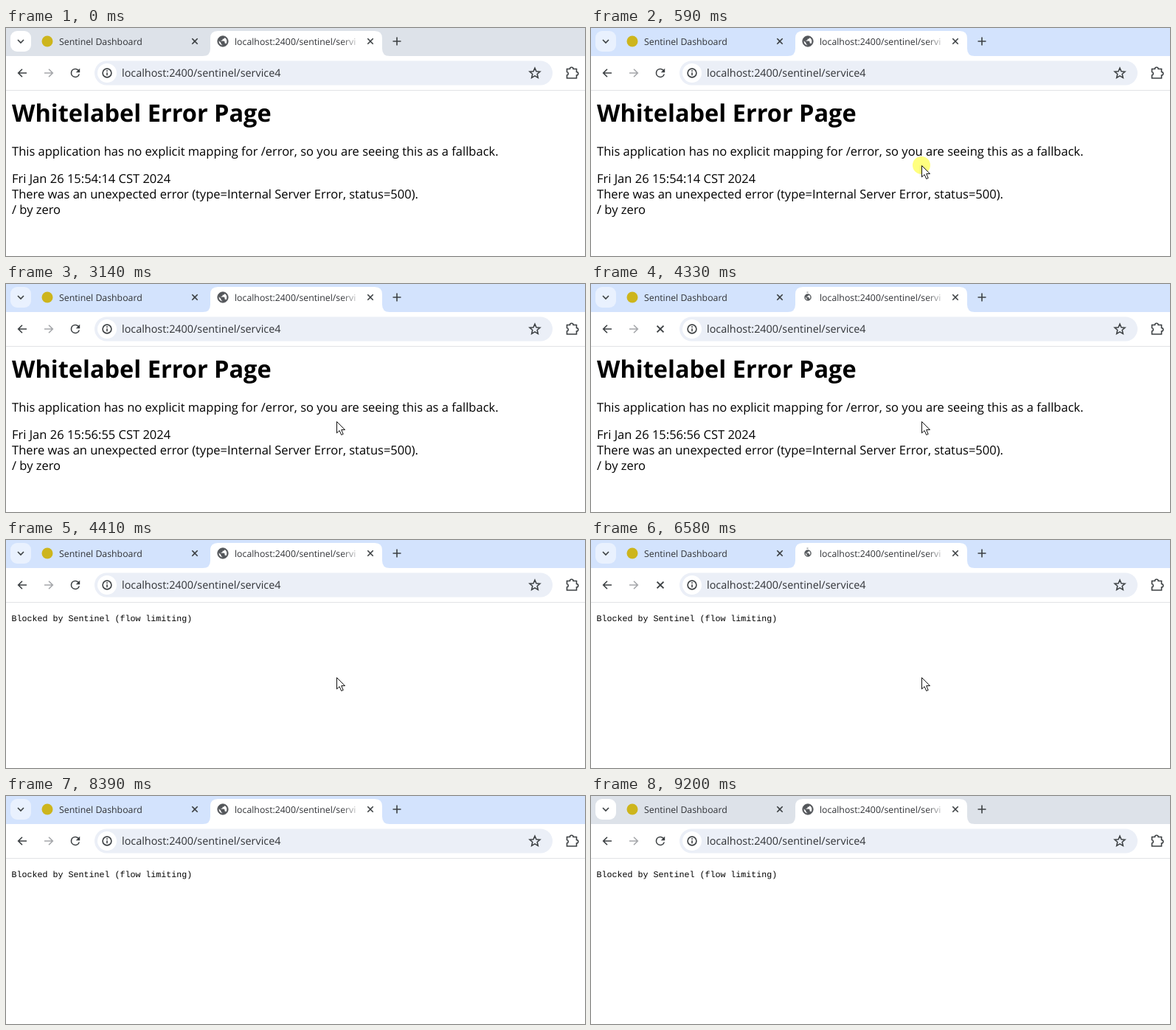
An HTML page for the animation above (9.27 s loop, 785 px wide and 309 px high).

```html
<!DOCTYPE html>
<html lang="en">
<head>
<meta charset="utf-8">
<title>Flow limiting demo</title>
<style>
  html, body { margin: 0; width: 100%; height: 100%; overflow: hidden; background: #fff; }
  svg { display: block; width: 785px; height: 309px; }
  text { font-family: "Open Sans", "Noto Sans", sans-serif; text-rendering: geometricPrecision; white-space: pre; }
  .line { fill: none; stroke: #3c4043; stroke-width: 1.6; }
  .tab { font-size: 12.3px; fill: #303236; }
  .url { font-size: 14.4px; fill: #303236; }
  .page { font-size: 16.5px; }
  .title { font-size: 32.5px; font-weight: 700; }
  .mono { font: 11.67px "Liberation Mono", monospace; }
</style>
</head>
<body>
<svg viewBox="0 0 785 309">
  <defs>
    <linearGradient id="fade"><stop offset="0" stop-color="#fff" stop-opacity="0"/><stop offset="1" stop-color="#fff"/></linearGradient>
    <path id="globe" fill="#54575b" stroke="#54575b" transform="translate(-12 -12)" d="M12 2C6.48 2 2 6.48 2 12s4.48 10 10 10 10-4.48 10-10S17.52 2 12 2zm-1 17.93c-3.95-.49-7-3.85-7-7.93 0-.62.08-1.21.21-1.79L9 15v1c0 1.1.9 2 2 2v1.93zm6.9-2.54c-.26-.81-1-1.39-1.9-1.39h-1v-3c0-.55-.45-1-1-1H8v-2h2c.55 0 1-.45 1-1V7h2c1.1 0 2-.9 2-2v-.41c2.93 1.19 5 4.06 5 7.41 0 2.08-.8 3.97-2.1 5.39z"/>
    <path id="cross" class="line" d="M-3.7-3.7l7.4 7.4M3.7-3.7l-7.4 7.4"/>
    <path id="arrow" fill="none" stroke-width="1.6" d="M6 0H-5M0-5.3L-5.3 0 0 5.3"/>
  </defs>

  <!-- tab strip -->
  <rect id="strip" width="785" height="38"/>
  <rect id="search" x="6" y="4" width="28" height="28" rx="9"/>
  <path class="line" d="M16 16l4 4 4-4"/>
  <circle cx="56" cy="18" r="7.5" fill="#cdb51c"/>
  <text class="tab" x="72" y="23">Sentinel Dashboard</text>
  <use href="#cross" x="256" y="18"/>
  <path fill="#fff" d="M267 38q10 0 10-10V14q0-10 10-10H500q10 0 10 10V28q0 10 10 10z"/>
  <text class="tab" x="310" y="23">localhost:2400/sentinel/servi</text>
  <rect x="454" y="8" width="28" height="22" fill="url(#fade)"/>
  <use href="#cross" x="494" y="18"/>
  <path class="line" d="M524.5 18h11M530 12.5v11"/>

  <!-- toolbar -->
  <use href="#arrow" x="22" y="61" stroke="#3c4043"/>
  <use href="#arrow" transform="translate(58 61) scale(-1 1)" stroke="#a5a7aa"/>
  <rect x="120" y="44.5" width="621" height="33" rx="16.5" fill="#ebeff7"/>
  <circle cx="137" cy="61" r="13" fill="#fff"/>
  <circle class="line" cx="137" cy="61" r="5.9"/>
  <path class="line" d="M137 60.2v4M137 57.3v1.7"/>
  <text class="url" x="157" y="66">localhost:2400/sentinel/service4</text>
  <path class="line" style="stroke-width:2.2" transform="translate(708.6 52.7) scale(.7)" d="M22 9.24l-7.19-.62L12 2 9.19 8.63 2 9.24l5.46 4.73L5.82 21 12 17.27 18.18 21l-1.63-7.03z"/>
  <path class="line" d="M760.5 55.5h4a2.3 2.3 0 0 1 4.6 0h4.4v4a2.3 2.3 0 0 1 0 4.6v3.9h-13v-4a2.3 2.3 0 0 0 0-4.5z"/>
  <rect y="84" width="785" height="1" fill="#e1e3e6"/>

  <g id="idle">
    <use href="#globe" transform="translate(294 18) scale(.72)"/>
    <path fill="#3c4043" transform="translate(84.6 51.6) scale(.78)" d="M17.65 6.35A8 8 0 0 0 12 4a8 8 0 1 0 7.73 10h-2.08A6 6 0 1 1 12 6c1.66 0 3.14.69 4.22 1.78L13 11h7V4z"/>
  </g>
  <g id="loading">
    <use href="#globe" transform="translate(294 18) scale(.45)"/>
    <path d="M292.5 11.2h2" stroke="#8a8d91" stroke-width="1.3"/>
    <use href="#cross" transform="translate(94 61) scale(1.2)"/>
  </g>

  <!-- page -->
  <g id="error">
    <text class="title" x="8" y="127">Whitelabel Error Page</text>
    <text class="page" x="8" y="173">This application has no explicit mapping for /error, so you are seeing this as a fallback.</text>
    <text class="page" x="8" y="210">Fri Jan 26 <tspan id="clock"></tspan> CST 2024</text>
    <text class="page" x="8" y="231">There was an unexpected error (type=Internal Server Error, status=500).</text>
    <text class="page" x="8" y="252">/ by zero</text>
  </g>
  <text id="blocked" class="mono" x="7.5" y="110">Blocked by Sentinel (flow limiting)</text>

  <circle id="click" cx="448" cy="186" r="12" fill="#ff0" fill-opacity=".5"/>
  <path id="cursor" fill="#fff" stroke="#111" d="M.5.5V16l3.6-3.4 2.6 5.9 2.5-1.1-2.5-5.8h4.8z"/>
</svg>
<script>
  const LOOP = 9270;
  const LOADS = [[1060, 1140], [1520, 1590], [2660, 2730], [3920, 4000],
                 [4330, 4410], [6580, 6650], [7450, 7530], [7980, 8050]];
  const CLOCK = [[0, "15:54:14"], [1140, "15:56:53"], [1930, "15:56:54"],
                 [3140, "15:56:55"], [4000, "15:56:56"]];
  const CURSOR = [[0, null], [120, [561, 243]], [190, [472, 198]], [260, [448, 186]],
                  [8120, [450, 188]], [8190, [464, 196]], [8250, [520, 224]],
                  [8320, [614, 266]], [8390, null]];
  const BLOCKED_AT = 4410;

  const el = id => document.getElementById(id);
  const valueAt = (steps, t) => steps.filter(([start]) => start <= t).pop()[1];
  const within = (t, [start, end]) => t >= start && t < end;
  const show = (id, on) => el(id).setAttribute("visibility", on ? "visible" : "hidden");

  function draw(t) {
    const busy = LOADS.some(span => within(t, span));
    show("loading", busy);
    show("idle", !busy);
    show("error", t < BLOCKED_AT);
    show("blocked", t >= BLOCKED_AT);
    show("click", within(t, [520, 660]));

    const focused = within(t, [590, 9200]);
    el("strip").setAttribute("fill", focused ? "#d3e3fd" : "#dde2e9");
    el("search").setAttribute("fill", focused ? "#e9f1fe" : "#fff");
    el("clock").textContent = valueAt(CLOCK, t);

    const tip = valueAt(CURSOR, t);
    show("cursor", tip);
    if (tip) el("cursor").setAttribute("transform", `translate(${tip})`);
  }

  const origin = performance.now();
  function tick() {
    draw((performance.now() - origin) % LOOP);
    requestAnimationFrame(tick);
  }
  tick();
</script>
</body>
</html>
```
